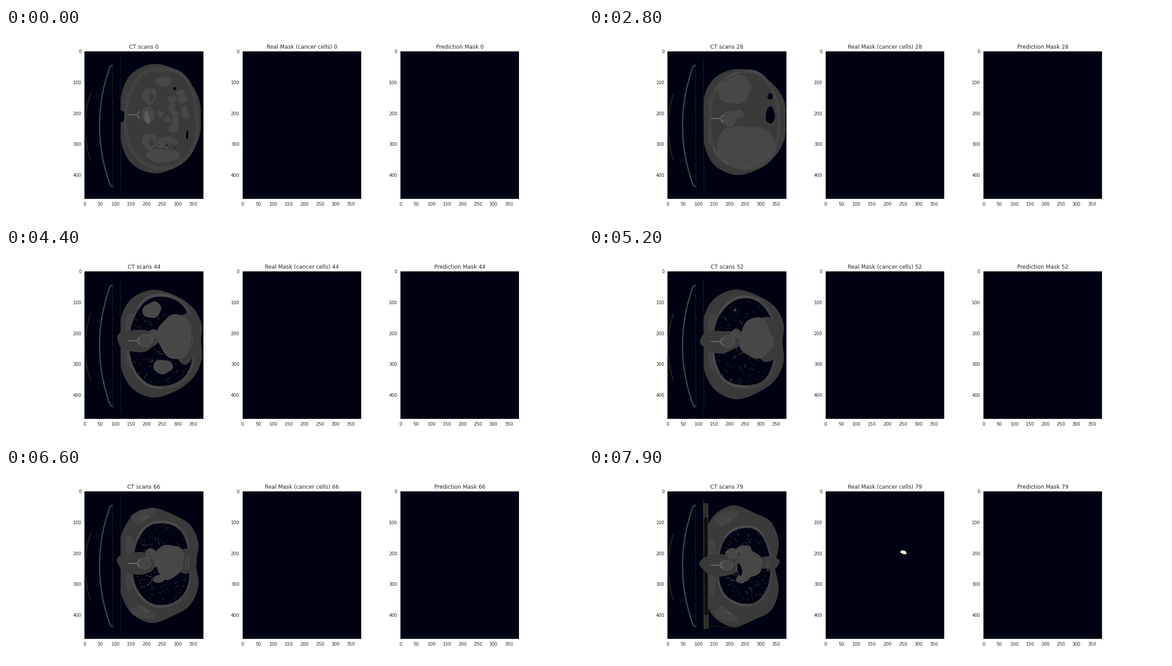
A matplotlib script for the animation above (8000 ms loop, 1280 px wide and 427 px high).

```python
import numpy as np
import matplotlib.pyplot as plt
from matplotlib.animation import FuncAnimation
from matplotlib.collections import LineCollection
from matplotlib.patches import Polygon

WIDTH, HEIGHT, DPI = 1280, 427, 64
PT = 72 / DPI  # points per pixel
FRAMES, INTERVAL = 80, 100

INK = "#262626"
AIR, FAT, MUSCLE, ORGAN = "#010114", "#3a3a3a", "#424242", "#474747"
BONE, BRIGHT = "#5c5c5c", "#808080"
TABLE, FAINT, PAD, VESSEL = "#474741", "#24241e", "#2d2d2a", "#3a3a2f"
MASK = "#fbeadc"

BOX_X, BOX_Y, BOX_W, BOX_H, BOX_STEP = 174.3, 52, 263.4, 328, 350.3
TITLES = ["CT scans", "Real Mask (cancer cells)", "Prediction Mask"]
PAD_START = 73

# Half contours of the body from back to front: x, distance from the midline
BELLY = np.array([(254, 40), (268, 86), (296, 112), (337, 121.5),
                  (384, 104), (414, 72), (430, 36), (432, 0)])
CHEST = np.array([(250, 50), (267, 98), (288, 122), (323, 135.5),
                  (368, 118), (404, 98), (421, 52), (413, 0)])


def mix(a, b, t):
    return a + (b - a) * t


def ramp(n, start, end):
    """Smooth step from 0 to 1."""
    t = np.clip((n - start) / (end - start), 0, 1)
    return t * t * (3 - 2 * t)


def bump(n, peak, spread):
    return np.exp(-((n - peak) / spread) ** 2)


def smooth(points, steps=8):
    """Closed Catmull-Rom curve through the points."""
    b = np.asarray(points, float)
    a, c, d = np.roll(b, 1, 0), np.roll(b, -1, 0), np.roll(b, -2, 0)
    t = np.linspace(0, 1, steps, endpoint=False)[:, None, None]
    curve = (2 * b + (c - a) * t + (2 * a - 5 * b + 4 * c - d) * t**2
             + (3 * b - a - 3 * c + d) * t**3) / 2
    return curve.swapaxes(0, 1).reshape(-1, 2)


def oval(x, y, rx, ry, tilt=0, rough=0.05, square=2):
    """Tilted superellipse with a slightly uneven edge."""
    a = np.linspace(0, 2 * np.pi, 72, endpoint=False)
    r = 1 + rough * np.sin(3 * a + x) + 0.7 * rough * np.sin(5 * a - y)
    cos, sin = np.cos(a), np.sin(a)
    u = rx * r * np.sign(cos) * np.abs(cos) ** (2 / square)
    v = ry * r * np.sign(sin) * np.abs(sin) ** (2 / square)
    c, s = np.cos(np.radians(tilt)), np.sin(np.radians(tilt))
    return np.column_stack([x + u * c - v * s, y + u * s + v * c])


def midline(n):
    return 201.5 + 17 * (n / 79) ** 2


def body_outline(n):
    mid, swell = midline(n), np.sin(np.pi * n / 79)
    x, dy = mix(BELLY, CHEST, (n / 79) ** 2).T
    x = np.concatenate([x, x[-2::-1]])
    y = mid + np.concatenate([-dy, dy[-2::-1]])
    x += 7 * swell * np.maximum(x - 345, 0) / 87
    y += 12 * swell * np.maximum(mid - y, 0) / 122
    curve = smooth(np.column_stack([x, y]))
    curve[:, 0] = np.maximum(curve[:, 0], 264 if n >= PAD_START else 254.5)
    return curve


def place(left):
    return [left / WIDTH, 1 - (BOX_Y + BOX_H) / HEIGHT, BOX_W / WIDTH, BOX_H / HEIGHT]


def make_panel(left):
    ax = fig.add_axes(place(left), facecolor=AIR)
    ax.set(xlim=(-0.5, 383.5), ylim=(477.5, -0.5),
           xticks=range(0, 351, 50), yticks=range(0, 401, 100))
    ax.tick_params(length=0, pad=7 * PT, labelsize=10 * PT, labelcolor=INK)
    ax.spines[:].set_visible(False)
    return ax


def make_overlay(left):
    """Axes over a panel, measured in stage pixels."""
    ax = fig.add_axes(place(left))
    ax.set(xlim=(left, left + BOX_W), ylim=(BOX_Y + BOX_H, BOX_Y))
    ax.axis("off")
    return ax


plt.rcParams["font.family"] = "DejaVu Sans"
fig = plt.figure(figsize=(WIDTH / DPI, HEIGHT / DPI), dpi=DPI, facecolor="white")
panels = [make_panel(BOX_X + i * BOX_STEP) for i in range(3)]
scan = make_overlay(BOX_X)
mask = make_overlay(BOX_X + BOX_STEP)
live = []


def keep(artist):
    artist.set_zorder(len(live) + 5)
    live.append(artist)
    return artist


def fill(points, color, ax=scan):
    return keep(ax.add_patch(Polygon(points, facecolor=color, edgecolor="none")))


def line(x, y, color, width=1.0):
    keep(scan.plot(x, y, color=color, lw=width * PT, solid_capstyle="round")[0])


def loop(points, color, width=1.0):
    closed = np.vstack([points, points[:1]])
    line(closed[:, 0], closed[:, 1], color, width)


def blob(color, size, x, y, rx, ry, tilt=0):
    if size > 0.08:
        fill(oval(x, y, rx * size, ry * size, tilt), color)


def draw_table(n):
    y = np.linspace(86, 350, 60)
    x = 207.5 + 24.5 * ((y - 217) / 135) ** 2
    x, y = np.r_[236, x, 237], np.r_[82.5, y, 353]
    line(x, y, TABLE, 2.8)
    y = np.linspace(145, 295, 40)
    line(175.2 + 12.5 * ((y - 220) / 75) ** 2, y, "#3a3a35", 1.4)
    line([236, 237], [83, 352], FAINT)
    line([253.5, 255], [69, 366], FAINT)
    for dot_y in (111.5, 166 - 14 * n / 79):
        line([236.5, 237.5], [dot_y, dot_y], TABLE, 1.4)


def draw_pad():
    for top, bottom, color in ((78, 358, "#0d0d14"), (78, 110, PAD), (326, 358, PAD)):
        fill([(254, top), (264, top), (265, bottom), (255, bottom)], color)
    for x in (254.5, 263.5):
        line([x, x + 1], [78, 358], TABLE, 1.2)
    x = np.linspace(265, 335, 40)
    line(x, 354.5 - 3 * np.sin((x - 262) / 11) * np.exp((265 - x) / 50), FAINT)


def draw_wall(n, wall):
    mid, chest = midline(n), ramp(n, 50, 66)
    fill(body_outline(n), FAT)
    blob(AIR, 1 - ramp(n, 10, 24), 253, mid - 5, 11, 15)
    for side in (-1, 1):
        blob(MUSCLE, 1, mix(278, 273, n / 79), mid + 37 * side,
             mix(15, 8, n / 79), mix(22, 28, n / 79))
        blob(MUSCLE, chest, 303, mid + 109 * side, 29, 11, 20 * side)
        if chest > 0.2:
            loop(oval(303, mid + 98 * side, 15 * chest, 2.5, 33 * side), BONE, 1.1)
    center = wall.mean(0)
    fill(center + (wall - center) * 1.08, MUSCLE)
    fill(wall, FAT)


def draw_belly(n, rng):
    mid = midline(n)
    shown = 1 - ramp(n, 10, 30)
    places = np.random.default_rng(4)
    for _ in range(11):
        x, y = places.uniform((348, 140), (402, 245))
        drift = places.normal(0, 0.3, 2) * n
        blob(ORGAN, shown, x + drift[0], y + drift[1], *places.uniform(6, 11, 2))
    blob(ORGAN, 1 - ramp(n, 4, 16), 357, 255, 24, 14)
    for _ in range(max(0, 24 - 4 * n)):
        x, y = rng.normal((362, 260), (10, 5))
        line([x, x + 0.8], [y, y], AIR, 1.4)


def draw_lungs(n, wall, rng):
    size = ramp(n, 28, 38)
    if size < 0.05:
        return
    center = wall.mean(0)
    curve = center + (wall - center) * size
    lungs = fill(curve, AIR)
    # short vessel pieces pointing away from the nearer hilum, longer close to it
    start = rng.uniform(curve.min(0), curve.max(0), (240, 2))
    hub_y = center[1] + 30 * np.sign(start[:, 1] - center[1])
    away = start - np.column_stack([np.full(240, 333), hub_y])
    reach = np.hypot(*away.T)[:, None] + 1
    bend = rng.normal(0, 0.5, (240, 2))
    end = start + (away / reach + bend) * rng.uniform(1, 3, (240, 1)) * (1 + 25 / reach)
    widths = rng.uniform(0.5, 1.1, 240) + 12 / (reach[:, 0] + 8)
    pieces = LineCollection(np.stack([start, end], 1), colors=VESSEL, linewidths=widths * PT)
    keep(scan.add_collection(pieces, autolim=False)).set_clip_path(lungs)
    # tissue that parts the two lungs, behind and in front of the heart
    blob(FAT, size, 292, center[1] - 3, 46, 25)
    blob(FAT, size, 394, center[1] - 8, 30, mix(56, 14, ramp(n, 44, 79)))


def draw_organs(n):
    mid = midline(n)
    grow = ramp(n, 0, 28)
    kidney = 1 - ramp(n, 8, 24)
    blob(ORGAN, 1 - ramp(n, 34, 56), mix(350, 324, grow), mix(119, 138, grow),
         mix(18, 38, grow), mix(11, 30, grow), -25 * grow)
    blob(ORGAN, 1 - ramp(n, 28, 54), 348, mix(284, 264, grow), mix(38, 66, grow), mix(15, 48, grow))
    for side in (-1, 1):
        x, y = 318 - 0.5 * n, mid + (51 - 0.4 * n) * side
        blob(FAT, kidney, x, y, 19, 20)
        blob(ORGAN, kidney, x, y, 16, 18)
        blob(FAT, kidney, x + 5, y + 3, 6, 8)

    late = np.clip((n - 44) / 35, 0, 1)
    arch = ramp(n, 54, 79)
    blob(ORGAN, ramp(n, 30, 44), mix(375, 354, late), mix(197, 214, late),
         mix(38, 30, late), mix(50, 32, late), 20 * arch)
    blob(ORGAN, 1, mix(342, 318, n / 79), 191, mix(7, 15, n / 79), mix(7, 13, n / 79))
    blob(ORGAN, arch, 344, 183, 18, 11)
    blob(ORGAN, ramp(n, 54, 68), 341, 246, 16, 9, -15)
    blob(AIR, arch, 334, 226, 5, 14, -10)

    blob(AIR, bump(n, 0, 4), 374, 135, 3, 4)
    blob(AIR, bump(n, 0, 4), 402, 238, 2.5, 10)
    blob(AIR, bump(n, 28, 6), 402, 194, 10, 19)
    blob(AIR, bump(n, 28, 6), 402, 152, 6, 7)


def draw_ribs(n, wall):
    center = wall.mean(0)
    ring = center + (wall - center) * 1.04
    count = len(ring)
    length = round(mix(1, 6, ramp(n, 8, 50)))
    if n < 8:
        return
    for i in range(6):
        # three per side, sliding a little along the wall
        turn = 0.24 + 0.07 * (i // 2) + 0.015 * np.sin(n / 6 + i)
        first = int((turn if i % 2 else 1 - turn) * count)
        x, y = ring[np.arange(first, first + length + 1) % count].T
        line(x, y, BONE, 2.2)
        line(x, y, ORGAN, 1)


def draw_bones(n):
    t = n / 79
    x, y = mix(315, 305, t), mix(193, 216, t)
    vertebra = oval(x, y, 15, mix(18, 11, t), rough=0.03)
    fill(vertebra, ORGAN)
    if n > 5:
        loop(vertebra, BONE, 1.1)
    blob(BONE, bump(n, 0, 4), 313, 199, 6, 15, -10)
    line([270, 289], [y, y], BONE, 2.4)
    line([274, 289], [y, y], BRIGHT)
    for side in (-1, 1):
        line([289, 293, 296, 295], y + side * np.array([0, 3, 5, 9]), BONE, 2.2)
        line([291, 295], [y + side * 2, y + side * 6], BRIGHT)
    if n > 38:
        loop(oval(mix(426, 398, t), midline(n), 3, 11), BONE, 1.1)
    blob(BRIGHT, bump(n, 13, 2), 431, 205, 2, 5)


def draw_scan(n):
    rng = np.random.default_rng(n)
    w = (n / 79) ** 2
    wall = oval(345, midline(n) + 2 * np.sin(np.pi * n / 79),
                mix(76, 57, w), mix(106, 84, w), rough=0.015, square=2.3)
    draw_table(n)
    if n >= PAD_START:
        draw_pad()
    draw_wall(n, wall)
    draw_belly(n, rng)
    draw_lungs(n, wall, rng)
    draw_organs(n)
    draw_ribs(n, wall)
    draw_bones(n)


def draw_mask(n):
    size = ramp(n, 73, 79)
    if size > 0:
        fill(oval(697.6, 187.5, 6.8 * size, 3.8 * size, 18, 0.04, 2.5), MASK, mask)


def update(n):
    while live:
        live.pop().remove()
    for ax, title in zip(panels, TITLES):
        ax.set_title(f"{title} {n}", fontsize=12 * PT, color=INK, pad=6 * PT)
    draw_scan(n)
    draw_mask(n)
    return live


anim = FuncAnimation(fig, update, frames=FRAMES, interval=INTERVAL, repeat=True, repeat_delay=0)
plt.show()
```
